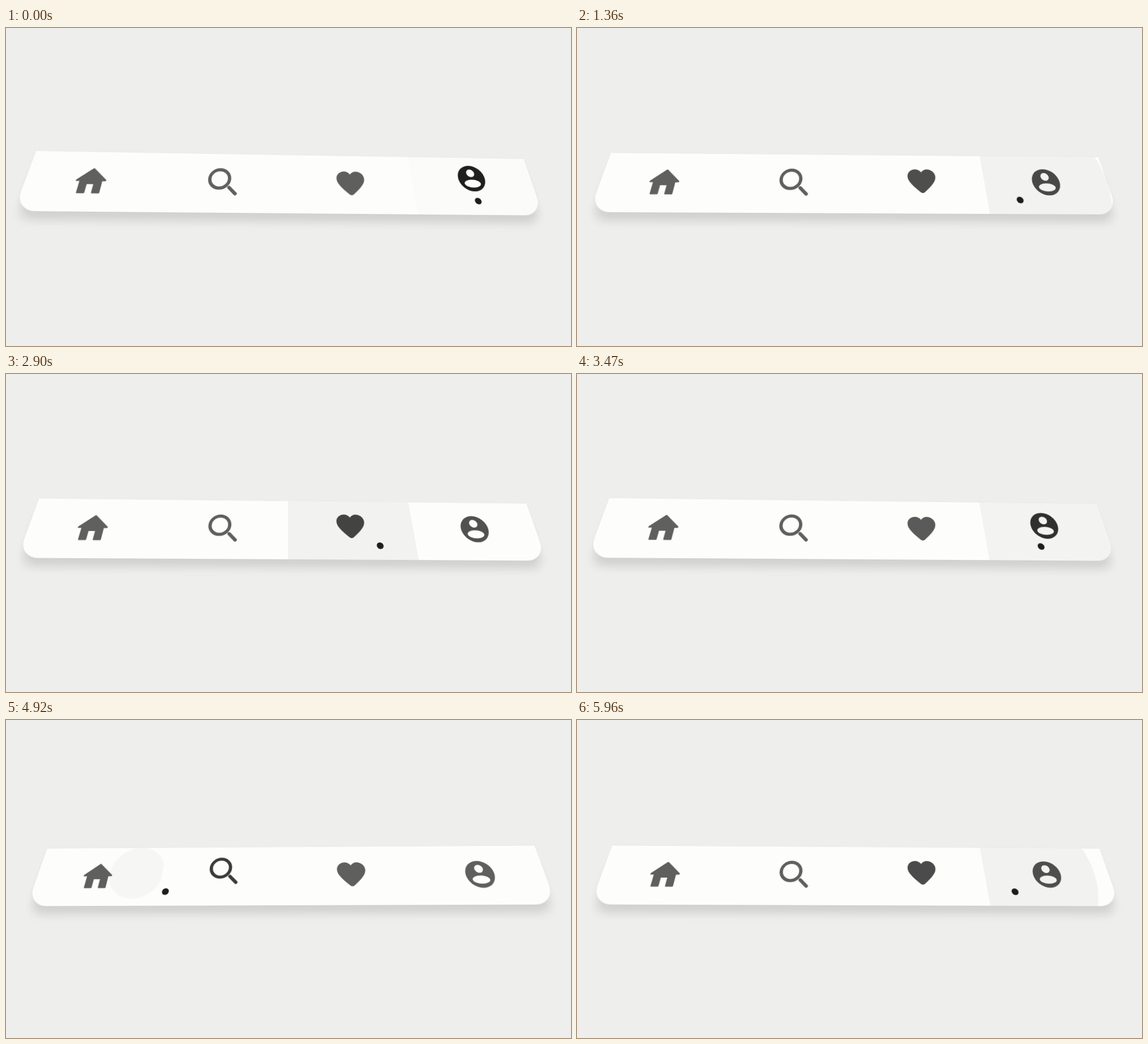
Recreate the animation shown at these times as an HTML page. Size 998 by 561 pixels, loop 5.99 s.

```html
<!DOCTYPE html>
<html lang="en">
<head>
<meta charset="utf-8">
<title>Tab bar</title>
<style>
  html, body { margin: 0; width: 100%; height: 100%; overflow: hidden; background: #eeeeec; }
  #bar {
    position: absolute; left: 49.5px; top: 218.6px; width: 896px; height: 108.5px;
    overflow: hidden; background: #fdfdfb; border-radius: 0 0 34px 34px;
    box-shadow: 0 22px 15px -8px rgba(0, 0, 0, .125), 0 0 6px rgba(0, 0, 0, .025);
  }
  svg { display: block; }
  .icon { fill: #1d1d1c; stroke: #1d1d1c; stroke-width: 0; stroke-linecap: round; stroke-linejoin: round; }
</style>
</head>
<body>
<div id="bar">
  <svg width="896" height="109">
    <clipPath id="tab"><rect id="tabRect" width="224" height="109"/></clipPath>
    <g clip-path="url(#tab)"><circle id="ripple" cy="48"/></g>
    <g class="icon">
      <path transform="translate(-3)" stroke-width="3" d="M0-21.5L24-.6H17.7V21.4H7V5H-7V21.4H-17.7V-.6H-24Z"/>
    </g>
    <g class="icon">
      <circle cx="-8" cy="-6.3" r="17.2" fill="none" stroke-width="5.8"/>
      <path d="M9.4 9.6L20.6 20.8" stroke-width="6"/>
    </g>
    <g class="icon">
      <path d="M-3.5 20C-16.5 8-25 0-25-9.5C-25-23-7-28.5 0-17.7C7-28.5 25-23 25-9.5C25 0 16.5 8 3.5 20Q0 22.5-3.5 20Z"/>
    </g>
    <g class="icon">
      <path fill-rule="evenodd" d="M-25 0a25 25 0 1 0 50 0a25 25 0 1 0-50 0z
        M-7.5-10a7.5 7.5 0 1 0 15 0a7.5 7.5 0 1 0-15 0z M-15 10a15 7.6 0 1 0 30 0a15 7.6 0 1 0-30 0z"/>
    </g>
    <circle id="dot" cy="84" r="6" fill="#1d1d1c"/>
  </svg>
</div>
<script>
const LOOP = 5990, TAB = 224;
const $ = id => document.getElementById(id);
const bar = $('bar'), tabRect = $('tabRect'), ripple = $('ripple'), dot = $('dot');
const icons = document.querySelectorAll('.icon');

// Clicks: [time, tab]
const clicks = [[-900, 2], [-400, 3], [156, 1], [668, 2], [1180, 3], [1728, 2], [2215, 3],
  [2706, 2], [3205, 3], [3690, 2], [4270, 1], [4812, 0], [5300, 2], [5794, 3]];

const clamp = x => Math.max(0, Math.min(1, x));
const mix = (a, b, k) => a + (b - a) * k;
const center = tab => (tab + .5) * TAB;
const restTilt = tab => (tab - 1.5) * 1.4;

// The CSS "ease" curve
function ease(x) {
  x = clamp(x);
  let lo = 0, hi = 1, u;
  for (let i = 0; i < 24; i++) {
    u = (lo + hi) / 2;
    if (.75 * u * (1 - u) + u ** 3 < x) lo = u; else hi = u;
  }
  return .3 * u * (1 - u) ** 2 + 3 * u * u * (1 - u) + u ** 3;
}

// The bar leans towards the chosen tab with an exponential lag
function tiltAt(t) {
  let tilt = restTilt(3);
  clicks.forEach(([start, tab], i) => {
    if (i < 2 || start > t) return;
    const end = i + 1 < clicks.length ? Math.min(t, clicks[i + 1][0]) : t;
    tilt = mix(restTilt(tab), tilt, Math.exp((start - end) / 370));
  });
  return tilt;
}

function draw(t) {
  let n = 1;
  while (n < clicks.length - 1 && clicks[n + 1][0] <= t) n++;
  const from = clicks[n - 1][1], [start, to] = clicks[n], age = t - start;
  const leave = ease(age / 400), arrive = ease((age - 100) / 400);

  bar.style.transform = `perspective(450px) rotateX(20deg) rotateY(${tiltAt(t)}deg)`;
  dot.setAttribute('cx', mix(center(from), center(to), leave) + 1.5);

  icons.forEach((icon, i) => {
    const on = i === to ? arrive : i === from ? 1 - leave : 0;
    icon.setAttribute('transform', `translate(${center(i)} ${54.5 - 14 * on})`);
    icon.setAttribute('opacity', mix(.7, 1, on));
  });

  // The ripple spreads from the side the dot comes from
  tabRect.setAttribute('x', to * TAB);
  ripple.setAttribute('cx', center(to) + 66 * Math.sign(from - to));
  ripple.setAttribute('r', 320 * clamp((age - 82) / 178));
  ripple.setAttribute('opacity', .045 * Math.min(clamp((age - 60) / 80), clamp((440 - age) / 200)));
}

const begin = performance.now();
function frame() {
  draw((performance.now() - begin) % LOOP);
  requestAnimationFrame(frame);
}
frame();
</script>
</body>
</html>
```
